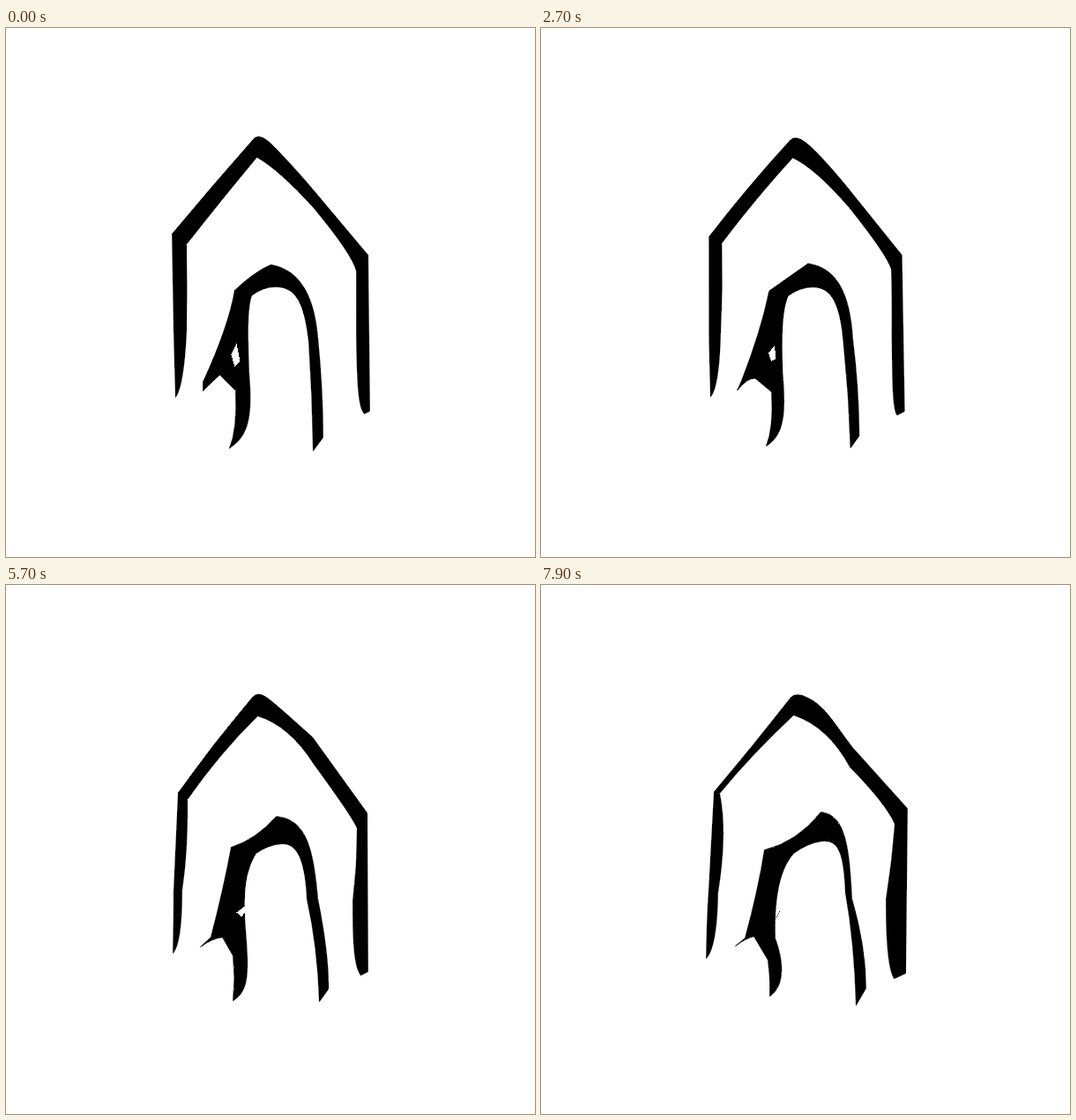
An HTML page for the animation above (8 s loop, 600 px wide and 600 px high).

```html
<!DOCTYPE html>
<html lang="en">
<head>
<meta charset="utf-8">
<title>Ink house</title>
<style>
  html, body { margin: 0; width: 100%; height: 100%; overflow: hidden; background: #fff; }
  svg { display: block; width: 100%; height: 100%; }
  .ink { stroke: #000; stroke-width: .8; stroke-linejoin: round; }
</style>
</head>
<body>
<svg viewBox="0 0 600 600" shape-rendering="crispEdges">
  <g transform="translate(.5 .5)">
    <path id="roof" class="ink"/>
    <path id="arch" class="ink"/>
    <path id="gap" fill="#fff"/>
    <path id="spur"/>
  </g>
</svg>
<script>
const LOOP = 8000, STEP = 100;
const times = [0, 1900, 4400, 5700, 7900];

// One path per key time; all paths of a shape share the same commands.
const poses = {
  roof: [
    'M188 233Q233 179 279 127Q285 118 297 128C307 137 330 162 347 182L410 257L412 434L406 437C398 430 398 390 397 350Q397 300 397 275Q392 256 349 204Q309 160 284 146Q244 194 204 245Q205 295 204 345Q201 405 192 418Q190 350 190 345Z',
    'M189 236Q234 179 282 127Q288 120 300 130C310 139 330 162 347 182L409 257L412 434L404 438C399 430 399 390 398 350Q398 300 397 273Q392 256 349 203Q309 158 285 146Q244 192 204 244Q206 295 204 345Q202 405 192 418Q190 350 190 345Z',
    'M193 236Q235 179 282 127Q288 121 300 129C313 136 332 157 348 178L408 257L411 435L402 440C395 432 397 390 397 350Q398 300 397 274Q392 258 350 204Q314 160 285 148Q243 191 205 243Q205 295 201 345Q201 405 192 417Q191 370 191 345Z',
    'M195 235Q234 180 279 127Q285 120 295 127C305 134 330 157 347 172L409 258L410 438L402 442C393 432 393 390 393 358Q398 318 398 276Q395 266 349 203Q321 159 285 148Q242 190 205 243Q206 300 199 346Q199 405 189 417Q190 370 190 345Z',
    'M196 234Q240 182 283 127Q289 121 301 127C322 136 334 160 353 184L415 253L413 440L400 446C392 432 391 390 391 356Q398 312 401 271Q392 249 350 206Q325 160 286 147Q238 192 202 236Q211 280 200 349Q199 410 187 423Q188 370 190 345Z'
  ],
  arch: [
    'M259 297Q281 276 300 268C334 274 349 305 353 350Q359 410 359 464L348 479Q347 415 343 355C338 314 330 293 305 293Q291 293 278 303C272 320 274 360 275 390C279 440 275 462 253 476Q262 455 260 411L242 393Q235 399 223 411L223 401Q252 338 259 297Z',
    'M259 298Q281 280 302 268C334 272 350 302 353 350Q359 410 359 463L350 477Q348 415 343 355C339 314 330 293 307 293Q293 293 279 303C272 320 273 360 274 390C278 440 275 460 255 475Q264 455 262 412L243 396Q234 395 222 411L226 400Q251 341 259 298Z',
    'M257 297Q283 284 303 264C338 269 350 300 353 357Q362 400 363 461L352 473Q351 420 342 360C339 314 330 294 309 294Q295 294 281 304C271 325 271 350 272 390C277 440 273 464 255 471Q263 445 259 413L242 399Q234 397 222 410L228 402Q246 345 257 297Z',
    'M255 297Q283 288 306 262C341 265 348 300 353 355Q366 420 365 458L355 472Q353 410 341 356C339 314 331 292 312 293Q297 294 283 304C270 325 268 350 271 390C275 440 275 460 257 471Q260 445 257 420L245 399Q234 400 220 410L232 399Q246 345 255 297Z',
    'M253 300Q290 291 317 257C346 260 349 300 352 355Q368 410 368 457L357 476Q355 405 345 349C343 305 338 288 318 290Q302 292 286 304C267 325 264 365 265 400C276 430 275 455 259 466Q260 445 257 425L241 398Q232 400 220 409L231 400Q246 345 253 300Z'
  ],
  gap: [
    'M261 357L255 370L259 384L265 377Z',
    'M263 358L257 368L260 379L265 375Z',
    'M268 362L259 369L262 374L267 374Z',
    'M270 364L261 371L267 376L270 371Z',
    'M268 368L265 372L267 374L268 371Z'
  ],
  spur: [
    'M268 378L268 378L268 378Z',
    'M268 378L268 378L268 378Z',
    'M268 378L268 378L268 378Z',
    'M267 377L268 377L268 378Z',
    'M265 379L271 368L268 375Z'
  ]
};

const numbers = d => d.match(/\d+/g).map(Number);
const shapes = Object.entries(poses).map(([id, paths]) => ({
  el: document.getElementById(id),
  shape: paths[0],
  keys: paths.map(numbers)
}));

function draw(now) {
  const t = Math.floor((now % LOOP) / STEP) * STEP;
  let k = 0;
  while (k < times.length - 2 && t >= times[k + 1]) k++;
  const mix = (t - times[k]) / (times[k + 1] - times[k]);

  for (const { el, shape, keys } of shapes) {
    const a = keys[k], b = keys[k + 1];
    let i = 0;
    el.setAttribute('d', shape.replace(/\d+/g, () => {
      const v = a[i] + (b[i] - a[i]) * mix;
      i++;
      return v.toFixed(2);
    }));
  }
}

const start = performance.now();
function tick() {
  draw(performance.now() - start);
  requestAnimationFrame(tick);
}
tick();
</script>
</body>
</html>
```
